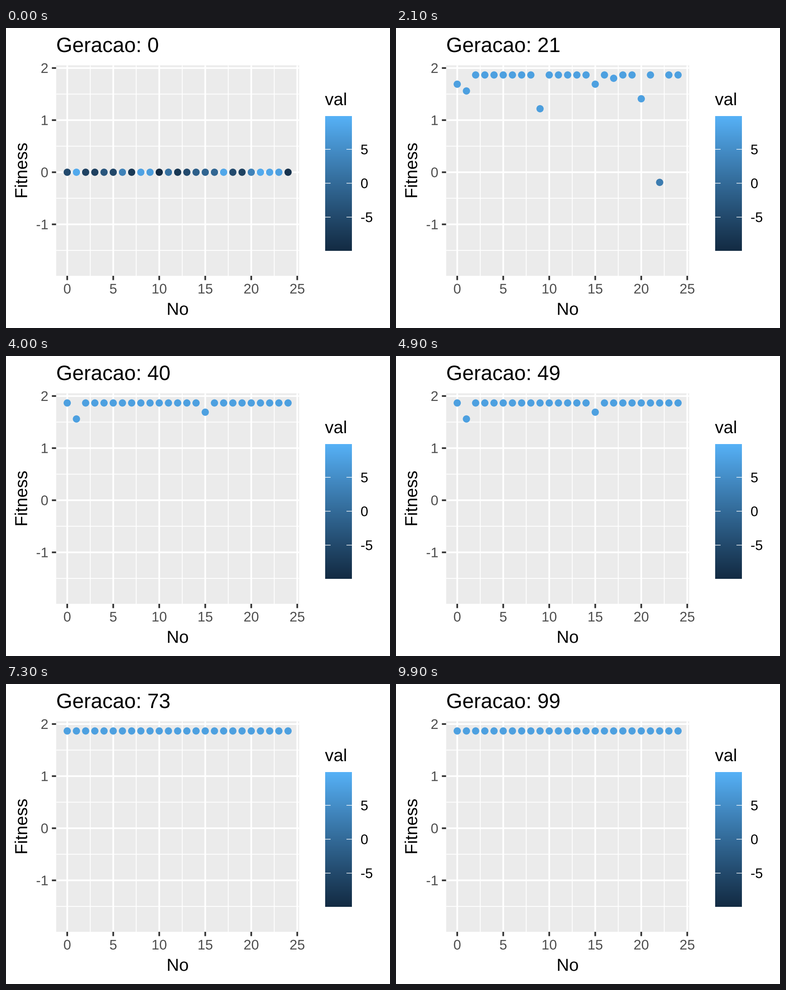
These frames come from a looping animation (847x661 px, 10 s). A matplotlib script:

```python
import matplotlib.pyplot as plt
import numpy as np
from matplotlib.animation import FuncAnimation
from matplotlib.patches import PathPatch, Rectangle
from matplotlib.textpath import TextPath
from matplotlib.transforms import Affine2D

W, H, DPI = 847, 661, 64
PT = 72 / DPI                      # points per pixel
LEFT, RIGHT, TOP, BOTTOM = 110.7, 646.5, 82.3, 546
BAR_L, BAR_R, BAR_T, BAR_B = 704, 763, 194, 491
BIG, MID, SMALL = 45.8, 38.2, 30.6
FONT = {"family": "Liberation Sans"}
GENERATIONS, SLOTS = 100, 25


# ---- colour scale: blue gradient interpolated in CIE Lab ----
M = np.array([[0.4124, 0.3576, 0.1805],
              [0.2126, 0.7152, 0.0722],
              [0.0193, 0.1192, 0.9505]])
WHITE = M.sum(axis=1)


def to_lab(rgb):
    c = np.array(rgb) / 255
    lin = np.where(c > 0.04045, ((c + 0.055) / 1.055) ** 2.4, c / 12.92)
    t = M @ lin / WHITE
    x, y, z = np.where(t > 0.008856, np.cbrt(t), 7.787 * t + 16 / 116)
    return np.array([116 * y - 16, 500 * (x - y), 200 * (y - z)])


def to_rgb(lab):
    l, a, b = np.moveaxis(lab, -1, 0)
    y = (l + 16) / 116
    t = np.stack([y + a / 500, y, y - b / 200], axis=-1)
    xyz = np.where(t > 0.2069, t ** 3, (t - 16 / 116) / 7.787) * WHITE
    lin = np.clip(xyz @ np.linalg.inv(M).T, 0, 1)
    return np.clip(np.where(lin > 0.0031308,
                            1.055 * lin ** (1 / 2.4) - 0.055, 12.92 * lin), 0, 1)


LOW, HIGH = to_lab((0x13, 0x2B, 0x43)), to_lab((0x56, 0xB1, 0xF7))


def shade(val):
    t = np.clip((np.asarray(val) + 9.97) / 19.9, 0, 1)[..., None]
    return to_rgb(LOW + t * (HIGH - LOW))


# ---- genetic search: every slot climbs to the best value ----
BEST, PEAK, PLATEAU = 7.6, 1.867, 1.69
LATE = [0, 1, 2, 11, 15, 16, 21]                    # pause on the plateau
LAGGARDS = {1: (1.56, 60), 15: (PLATEAU, 60), 20: (1.41, 40)}


def fitness(x):
    u = x + 0.35
    return 0.94 * (np.sin(u) + np.sin(10 * u / 3))


def mutate(rng):
    """Flip one bit of the best value."""
    step = 20 / 2 ** rng.integers(1, 8)
    val = BEST + step * rng.choice([-1, 1])
    return val if val <= 10 else BEST - step


def evolve():
    rng = np.random.default_rng(12)
    start = rng.uniform(-10, 10, SLOTS)
    arrive = rng.integers(2, 11, SLOTS)
    level, until = np.full(SLOTS, PLATEAU), arrive.copy()
    until[LATE] = rng.integers(14, 23, len(LATE))
    for i, (low, end) in LAGGARDS.items():
        level[i], until[i] = low, end

    pop = np.zeros((GENERATIONS, 2, SLOTS))
    pop[0, 0] = start
    for g in range(1, GENERATIONS):
        val = np.where(g < arrive, start, BEST)
        fit = np.where(g < arrive, fitness(start),
                       np.where(g < until, level, PEAK))
        hit = rng.random(SLOTS) < 0.01 + 0.3 * np.exp(-g / 12)
        for i in np.flatnonzero(hit):
            val[i] = mutate(rng)
            fit[i] = fitness(val[i])
        pop[g] = val, fit
    return pop


POP = evolve()


# ---- static plot ----
def px(n):
    return LEFT + (n + 1.2) * (RIGHT - LEFT) / 26.4


def py(f):
    return 317.8 - 114.8 * f


fig = plt.figure(figsize=(W / DPI, H / DPI), dpi=DPI, facecolor="white")
ax = fig.add_axes([0, 0, 1, 1])
ax.axis("off")


def line(xs, ys, width, color="white", z=2):
    ax.plot(xs, ys, color=color, lw=width * PT, solid_capstyle="butt",
            snap=False, zorder=z)


def ink_end(s, size):
    return TextPath((0, 0), s, size=size, prop=FONT).get_extents().x1


def text_path(x, y, s, size, align=0, turn=0):
    """Text outline on a baseline; align 0 is left, 0.5 centre, 1 right."""
    advance = ink_end(s + "H", size) - ink_end("H", size)
    place = (Affine2D().translate(-align * advance, 0).scale(1, -1)
             .rotate_deg(-turn).translate(x, y))
    return place.transform_path(TextPath((0, 0), s, size=size, prop=FONT))


def label(*args, color="black", **kw):
    return ax.add_patch(PathPatch(text_path(*args, **kw), fc=color, lw=0,
                                  snap=False, zorder=4))


ax.add_patch(Rectangle((LEFT, TOP), RIGHT - LEFT, BOTTOM - TOP,
                       fc="#EBEBEB", lw=0, snap=False, zorder=1))
for n in np.arange(2.5, 25, 5):
    line([px(n)] * 2, [TOP, BOTTOM], 1.85)
for f in np.arange(-1.5, 2):
    line([LEFT, RIGHT], [py(f)] * 2, 1.85)
for n in range(0, 26, 5):
    line([px(n)] * 2, [TOP, BOTTOM], 3.7, z=3)
    line([px(n)] * 2, [BOTTOM, BOTTOM + 9.5], 3.7, "#333333")
    label(px(n), 585, str(n), SMALL, color="#4D4D4D", align=0.5)
for f in range(-1, 3):
    line([LEFT, RIGHT], [py(f)] * 2, 3.7, z=3)
    line([LEFT - 9.5, LEFT], [py(f)] * 2, 3.7, "#333333")
    label(93.5, py(f) + 10.8, str(f), SMALL, color="#4D4D4D", align=1)

label((LEFT + RIGHT) / 2, 632, "No", MID, align=0.5)
label(46.6, (TOP + BOTTOM) / 2, "Fitness", MID, align=0.5, turn=90)

ramp = shade(np.linspace(9.93, -9.97, BAR_B - BAR_T))[:, None, :]
ax.imshow(ramp, extent=(BAR_L, BAR_R, BAR_B, BAR_T), aspect="auto",
          interpolation="nearest", zorder=1)
label(703.5, 170, "val", MID)
for v in (-5, 0, 5):
    y = 342 - 14.93 * v
    line([BAR_L, BAR_L + 12], [y, y], 1.3)
    line([BAR_R - 12, BAR_R], [y, y], 1.3)
    label(782, y + 10.8, str(v), SMALL)

ax.set_xlim(0, W)
ax.set_ylim(H, 0)

# ---- animated parts ----
title = label(LEFT, 53, "Geracao: 0", BIG)
slots_x = px(np.arange(SLOTS))
dots = ax.scatter(slots_x, np.full(SLOTS, py(0)), s=(16 * PT) ** 2,
                  linewidths=0, zorder=5)


def update(gen):
    val, fit = POP[gen]
    title.set_path(text_path(LEFT, 53, f"Geracao: {gen}", BIG))
    dots.set_offsets(np.column_stack([slots_x, py(fit)]))
    dots.set_facecolor(shade(val))
    return title, dots


anim = FuncAnimation(fig, update, frames=GENERATIONS, interval=100,
                     repeat=True, repeat_delay=0, blit=False)
plt.show()
```
